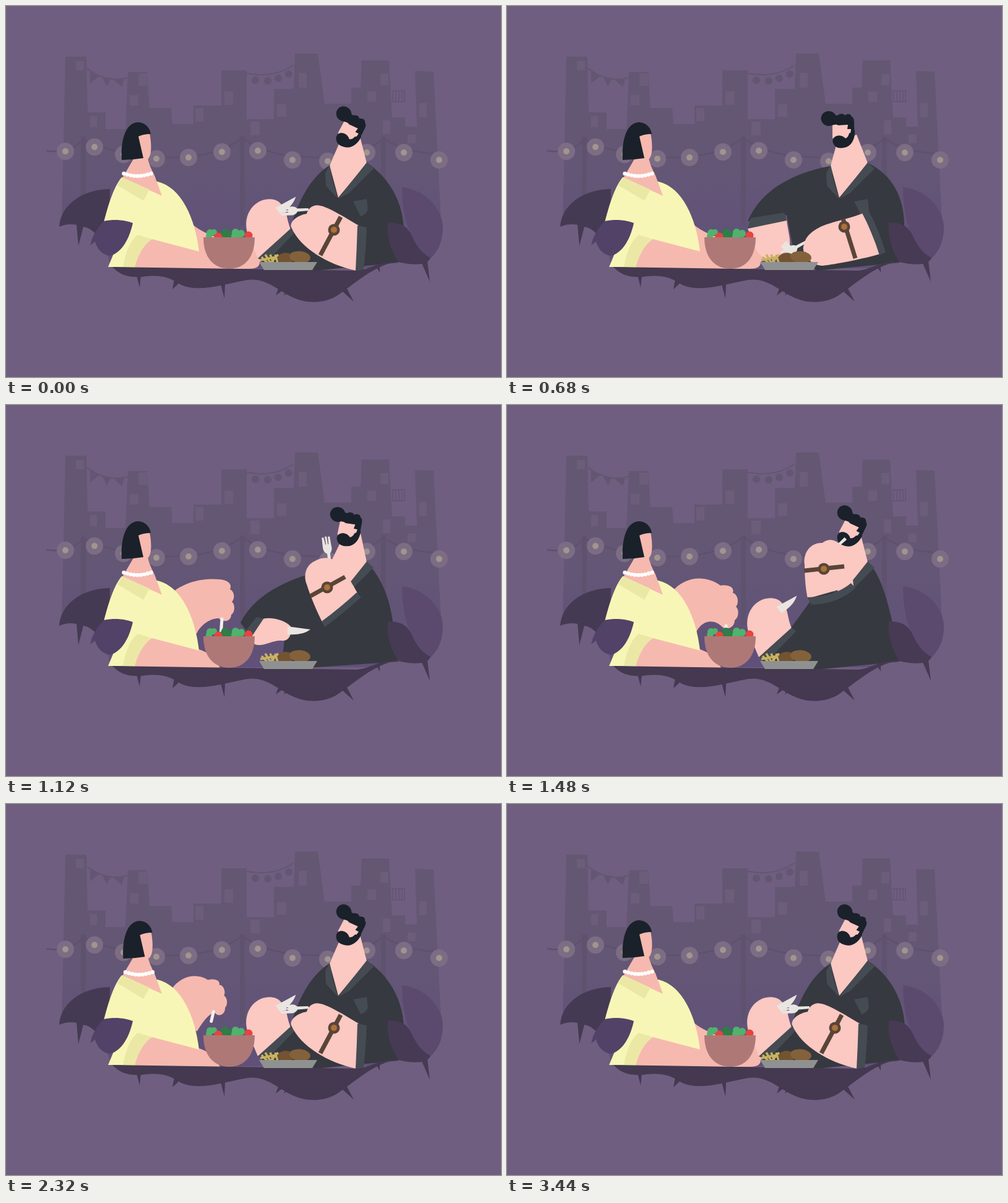
Write an HTML page with a canvas that moves like this. It is 800 px wide and 600 px high and loops after 3.48 s.

```html
<!DOCTYPE html>
<html lang="en">
<head>
<meta charset="utf-8">
<title>Dinner outside</title>
<style>
html, body { margin: 0; width: 100%; height: 100%; overflow: hidden; background: #6f5e80; }
canvas { display: block; }
</style>
</head>
<body>
<canvas id="stage" width="800" height="600"></canvas>
<script>
const ctx = document.getElementById('stage').getContext('2d');
const LOOP = 3480, STEP = 40;
const BG = '#6f5e80', SKIN = '#f6b9af', PALE = '#fbc8c2', SHIRT = '#36393f', TRIM = '#454b52',
  HAIR = '#1a212a', METAL = '#e9e5e0', DARK = '#443950', DRESS = '#f8f6b6', FOLD = '#ebe8a6';

function fill(path, color) {
  ctx.fillStyle = color;
  ctx.fill(new Path2D(path));
}
function stroke(path, color, width) {
  ctx.strokeStyle = color;
  ctx.lineWidth = width;
  ctx.stroke(new Path2D(path));
}
function oval(x, y, rx, ry, color, turn = 0) {
  ctx.fillStyle = color;
  ctx.beginPath();
  ctx.ellipse(x, y, rx, ry, turn, 0, 7);
  ctx.fill();
}
const dot = (x, y, r, color) => oval(x, y, r, r, color);

// Blend two strings that share their structure, number by number.
function blend(a, b, k) {
  if (a === b || k === 0) return a;
  const goal = b.match(/-?\d+(\.\d+)?/g);
  let i = 0;
  return a.replace(/-?\d+(\.\d+)?/g, n => (+n + (goal[i++] - n) * k).toFixed(2));
}
// keys: [time, pose name]; returns a sampler for any part of the figure
function sampler(keys, t) {
  let i = 0;
  while (i < keys.length - 2 && t >= keys[i + 1][0]) i++;
  const [t0, from] = keys[i], [t1, to] = keys[i + 1];
  const u = Math.min(1, Math.max(0, (t - t0) / (t1 - t0)));
  const k = u * u * (3 - 2 * u);
  return part => blend(part[from], part[to], k);
}
const nums = s => s.split(' ').map(Number);

const manKeys = [[0, 'rest'], [440, 'cut'], [760, 'cut'], [1120, 'lift'], [1320, 'eat'], [1540, 'eat'], [1840, 'rest'], [LOOP, 'rest']];
const headKeys = [[0, 'rest'], [440, 'cut'], [760, 'cut'], [1120, 'lift'], [1320, 'rest'], [1660, 'rest'], [1920, 'nod'], [2200, 'rest'], [LOOP, 'rest']];
const womanKeys = [[0, 'rest'], [720, 'rest'], [1120, 'reach'], [1320, 'bowl'], [2200, 'bowl'], [2640, 'eat'], [2920, 'eat'], [3320, 'rest'], [LOOP, 'rest']];
const womanHeadKeys = [[0, 'still'], [1600, 'still'], [1880, 'lean'], [2240, 'lean'], [3320, 'still'], [LOOP, 'still']];

const man = {
  body: {
    rest: 'M524,257 C492,277 472,315 459,362 L411,411 L425,422 L500,428 L634,415 C655,360 640,292 584,254 Z',
    cut: 'M521,259 C465,270 412,295 389,348 L452,338 L462,390 L500,428 L634,415 C646,370 655,290 584,254 Z',
    lift: 'M535,262 C470,275 405,300 379,352 L396,376 L450,378 L445,428 L634,415 C622,390 638,320 587,258 Z',
    eat: 'M540,255 C500,300 486,325 459,360 L409,410 L425,422 L500,428 L634,415 C625,360 614,290 586,256 Z'
  },
  farArm: {
    rest: 'M460,361 C452,340 455,332 447,324 C440,311 425,310 412,315 C390,325 383,350 392,372 L407,408 Z',
    cut: 'M452,346 C454,365 460,380 456,392 C452,405 430,408 418,408 C405,405 398,385 395,375 L389,360 Z',
    lift: 'M415,346 C430,342 452,349 460,358 C463,372 456,383 445,381 C430,380 415,392 402,387 L396,376 Z'
  },
  farCuff: {
    rest: 'M460,360 L407,408 L420,415 L467,366 Z',
    cut: 'M452,347 L389,360 L394,343 L448,334 Z',
    lift: 'M416,346 L396,376 L383,370 L405,343 Z'
  },
  nearArm: {
    rest: 'M570,355 C545,340 520,325 508,323 C496,320 488,328 486,336 C472,338 458,348 461,358 C476,392 520,418 566,428 Z',
    cut: 'M576,335 C550,345 520,350 505,358 C490,366 482,374 480,386 C474,398 490,420 510,420 C530,418 580,408 603,401 Z',
    lift: 'M568,304 C555,280 540,258 532,252 C520,244 505,248 500,252 C485,258 480,275 486,290 C492,310 503,335 511,351 Z',
    eat: 'M560,292 C558,270 556,240 540,227 C528,214 515,218 510,223 C490,222 478,240 481,258 C481,280 483,300 486,313 Z'
  },
  nearCuff: {
    rest: 'M568,355 Q567,390 565,428 L578,428 Q582,390 583,358 Z',
    cut: 'M574,335 Q590,365 602,403 L612,398 Q600,360 584,330 Z',
    lift: 'M567,303 Q540,328 510,350 L515,359 Q545,337 574,311 Z',
    eat: 'M556,288 Q530,310 485,311 L492,323 Q535,322 563,296 Z'
  },
  strap: {
    rest: 'M541,341 L508,403', cut: 'M543,344 L563,408',
    lift: 'M492,309 L548,278', eat: 'M480,268 L545,261'
  },
  watch: { rest: '530 362', cut: '545 357', lift: '519 295', eat: '512 265' },
  // x, y, degrees, visible length
  knife: { rest: '439 331 -36 46', cut: '447 384 40 46', lift: '455 364 0 46' },
  fork: { rest: '489 329 175 46', cut: '484 381 150 46', lift: '524 258 -100 46', eat: '534 228 -44 18' },
  pocket: { rest: '1', cut: '1', lift: '0', eat: '0' },
  head: { rest: '549 218 28', cut: '543 219 0', lift: '551 218 12', nod: '553 219 19' }
};
for (const name of ['farArm', 'farCuff', 'knife']) man[name].eat = man[name].rest;

const woman = {
  arm: {
    rest: 'M296,347 C306,362 340,378 390,386 C400,382 406,384 406,390 C412,390 414,397 411,401 C415,405 414,412 410,414 C410,424 400,425 390,425 C360,425 320,425 300,425 L280,360 Z',
    reach: 'M270,302 C295,283 325,280 345,282 C360,283 366,291 362,298 C370,302 370,314 365,318 C371,323 370,336 364,339 C364,351 350,352 344,345 C330,345 315,355 308,370 L280,340 Z',
    bowl: 'M267,302 C288,276 322,275 345,292 C360,290 368,296 365,304 C374,306 375,322 370,326 C376,332 374,345 368,348 C368,360 355,365 348,359 C335,345 315,348 306,367 L280,340 Z',
    eat: 'M264,297 C257,280 250,265 243,251 C243,243 250,242 254,241 C256,233 268,232 273,237 C280,232 290,238 291,246 C297,246 301,250 304,255 C330,275 342,352 321,371 L300,380 Z'
  },
  fork: {
    rest: 'M372,402 L360,400', reach: 'M349,346 L347,374',
    bowl: 'M354,357 L354,378', eat: 'M252,241 L232,232'
  },
  head: { still: '0 0', lean: '2.5 1' }
};

function drawCity() {
  const haze = ctx.createLinearGradient(0, 75, 0, 424);
  haze.addColorStop(0, '#635772');
  haze.addColorStop(.5, '#645775');
  haze.addColorStop(1, '#60507a');
  fill('M96,82 H130 L132,172 H161 V199 H193 L197,107 H228 L232,165 H267 L269,191 H303 V161 H348 V104 H389 V183 H433 V134 H465 L467,77 H504 L515,158 H558 V132 H573 L575,88 H619 L624,180 H645 V195 H664 L661,105 L691,106 L703,345 L650,360 L600,424 H170 L150,350 H90 Z', haze);
  const windows = ['113 89 13 15', '214 109 14 20', '200 144 14 17', '136 178 11 18', '353 138 14 22', '306 165 13 22',
    '395 187 15 22', '438 159 15 20', '473 108 13 24', '605 110 13 18', '584 138 14 17', '609 185 12 22', '668 157 12 23', '649 208 13 14'];
  ctx.fillStyle = '#6c5d7b';
  windows.forEach(w => ctx.fillRect(...nums(w)));
  const faint = '#635671';
  stroke('M131,101 Q162,125 196,116 M389,109 Q435,117 465,95', faint, 2);
  fill('M136,106 L150,114 L136,125 Z M156,116 H170 L163,130 Z M174,119 H191 L187,131 Z', faint);
  [[403, 120], [423, 121], [440, 117], [457, 110]].forEach(([x, y]) => dot(x, y, 6, faint));
  stroke('M623,137 H645 M623,155 H645 M625,137 V155 M630,137 V155 M635,137 V155 M640,137 V155 M644,137 V155', faint, 1.5);
}

function drawLights() {
  const cord = '#5e516d';
  ctx.fillStyle = '#5f526e';
  [125, 382, 610].forEach(x => ctx.fillRect(x - 4, 211, 8, 145));
  stroke('M65,234 Q103,240 125,216 Q175,239 235,244 Q335,251 382,213 Q415,239 470,243 Q565,253 610,214 Q645,239 710,239', cord, 2.5);
  [[96, 235], [143, 228], [190, 240], [243, 247], [295, 245], [349, 236], [407, 234], [463, 249], [520, 251], [583, 237], [643, 237], [700, 249]]
    .forEach(([x, y]) => {
      dot(x, y, 14, '#7c6d84');
      dot(x, y, 5, '#a1958f');
    });
}

function drawLeftBush() {
  fill('M86,357 C88,325 118,297 168,296 C168,325 165,343 158,358 L146,370 Q137,359 125,357 L117,388 L114,354 Q100,351 86,357 Z', '#453a53');
}
function drawRightBush() {
  fill('M640,293 C682,298 706,332 706,358 C706,385 695,400 685,409 C665,400 640,360 640,293 Z', '#5b4a6d');
}
function drawFrontLeaves() {
  fill('M617,350 C638,350 649,356 656,372 C665,392 675,402 686,407 C682,421 655,419 634,414 C622,395 615,375 617,350 Z M671,414 L681,412 L685,446 Z', '#473a54');
  fill('M158,348 C178,344 194,347 205,351 C198,382 184,401 167,404 C154,402 146,390 144,381 L136,387 Q140,366 158,348 Z', '#524267');
}

function drawTable() {
  fill('M172,422 L567,428 C590,426 600,412 640,413 L620,416 C585,428 565,448 540,465 C520,481 488,483 463,471 C438,459 420,439 390,443 C350,450 312,464 283,451 C263,438 250,434 220,438 C198,439 185,436 172,422 Z', DARK);
  fill('M211,436 H218 L216,455 Z M272,442 L282,446 L269,458 Z M347,450 H354 L353,473 Z M442,452 L451,457 L436,468 Z M453,459 L460,462 L449,468 Z M543,461 L550,455 L562,478 Z M598,421 L604,417 V431 Z', DARK);
}

function drawBowl() {
  const light = '#50b36d', deep = '#2f7d47', red = '#e8433f';
  [[330, 367, 6], [336, 366, 5], [328, 372, 5]].forEach(b => dot(...b, light));
  [[354, 366, 6], [351, 371, 6], [361, 370, 6]].forEach(b => dot(...b, deep));
  [[371, 366, 6], [380, 368, 6], [371, 372, 7]].forEach(b => dot(...b, light));
  dot(343, 373, 6.5, red);
  dot(392, 371, 6.5, red);
  fill('M319,374 H402 C402,406 386,425 361,425 C335,425 319,406 319,374 Z', '#ae7877');
}

function drawPlate() {
  stroke('M413,406 L422,415 M419,402 L427,415 M427,402 L432,415 M411,411 L436,406 M440,402 L428,415 M435,402 L439,415', '#c8b25f', 3.5);
  oval(452, 408, 13, 9, '#735332');
  oval(475, 406, 17, 9.5, '#83613b', .1);
  fill('M409,414 H503 L495,427 H417 Z', '#8f9190');
}

function drawWoman(t) {
  const pose = sampler(womanKeys, t);
  const [dx, dy] = nums(sampler(womanHeadKeys, t)(woman.head));
  fill(pose(woman.arm), SKIN);
  fill('M230,374 L308,394 C328,399 339,411 346,425 L200,424 L213,390 Z', SKIN);
  fill('M187,277 C173,293 163,330 158,350 L190,362 L165,422 L208,423 C212,405 222,385 236,377 L312,397 C306,343 283,293 245,284 Z', DRESS);
  fill('M213,370 L236,377 C222,386 212,405 208,423 L189,422 C193,400 200,380 213,370 Z', FOLD);
  fill('M207,246 L188,278 L252,307 L240,274 Q231,257 229,246 Z', SKIN);
  fill('M188,277 L180,290 L222,315 L232,297 Z', FOLD);
  ctx.save();
  ctx.translate(dx, dy);
  fill('M208,209 L232,205 C236,226 236,248 225,250 L228,262 L198,262 L207,246 Z', SKIN);
  fill('M187,249 C185,215 194,188 214,188 C227,189 233,199 234,207 Q222,207 214,211 L222,246 Q204,249 187,249 Z', HAIR);
  for (let i = 0; i < 9; i++) dot(190.5 + i * 5.5, 271 + 4 * Math.sin(i / 8 * Math.PI), 3.2, '#fff');
  ctx.restore();
  ctx.lineCap = 'round';
  stroke(pose(woman.fork), '#f1efec', 5);
  ctx.lineCap = 'butt';
}

function drawTool([x, y, angle, length], path) {
  ctx.save();
  ctx.translate(x, y);
  ctx.rotate(angle * Math.PI / 180);
  ctx.beginPath();
  ctx.rect(0, -12, length, 24);
  ctx.clip();
  fill(path, METAL);
  ctx.restore();
}

function drawManHead([x, y, angle]) {
  fill(`M${x - 10},${y + 3} L523,258 L537,310 L583,254 L${x + 22},${y - 11} Z`, PALE);
  fill('M523,257 L516,270 L517,291 L537,312 L528,284 Z M583,253 L594,263 L555,302 L537,312 Z', TRIM);
  ctx.save();
  ctx.translate(x, y);
  ctx.rotate(angle * Math.PI / 180);
  fill('M-17,-28 L14,-30 L18,-10 L8,6 L-10,4 L-17,-6 Z', PALE);
  fill('M-16,-4 C-13,-10 -3,-12 4,-5 C7,-6 9,-9 10,-13 L19,-18 C20,-6 15,4 8,8 C0,12 -10,12 -14,6 C-17,2 -17,-1 -16,-4 Z', HAIR);
  oval(-23, -37, 12.5, 12, HAIR, .2);
  fill('M-23,-26 L-23,-44 L-9,-42 C-4,-46 1,-45 3,-42 C8,-46 13,-44 14,-40 C20,-38 17,-28 19,-12 L12,-12 L13,-20 L7,-20 L8,-27 L-8,-26 C-12,-29 -17,-25 -23,-26 Z', HAIR);
  ctx.restore();
}

function drawMan(t) {
  const pose = sampler(manKeys, t);
  fill(pose(man.body), SHIRT);
  drawManHead(nums(sampler(headKeys, t)(man.head)));
  ctx.globalAlpha = +pose(man.pocket);
  fill('M561,316 L583,312 L585,329 Q582,338 573,340 Z', TRIM);
  ctx.globalAlpha = 1;
  fill(pose(man.farArm), PALE);
  fill(pose(man.farCuff), TRIM);
  drawTool(nums(pose(man.knife)), 'M0,-6 L37,-1 Q24,9 0,7 Z');
  drawTool(nums(pose(man.fork)), 'M0,-2 L18,-2 Q22,-8 30,-7 L45,-6 V-3 L33,-2 V-1 L46,-1 V2 L33,2 V3 L45,4 V7 L30,7 Q22,8 18,3 L0,2 Z');
  fill(pose(man.nearArm), PALE);
  fill(pose(man.nearCuff), TRIM);
  stroke(pose(man.strap), '#594538', 7);
  const [x, y] = nums(pose(man.watch));
  dot(x, y, 9.5, '#594538');
  dot(x, y, 5, '#ad7138');
}

function draw(t) {
  ctx.fillStyle = BG;
  ctx.fillRect(0, 0, 800, 600);
  drawCity();
  drawLights();
  drawLeftBush();
  drawRightBush();
  drawWoman(t);
  drawMan(t);
  drawFrontLeaves();
  drawTable();
  drawBowl();
  drawPlate();
}

const start = performance.now();
function tick() {
  const t = (performance.now() - start) % LOOP;
  draw(Math.floor(t / STEP) * STEP);
  requestAnimationFrame(tick);
}
tick();
</script>
</body>
</html>
```
